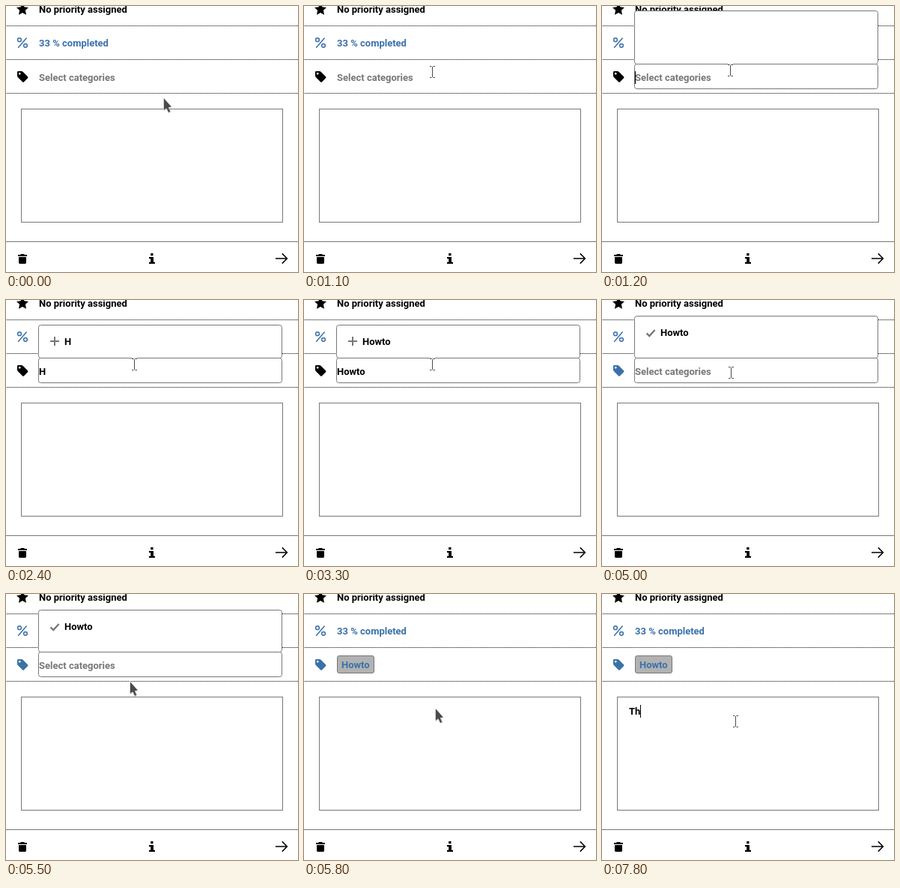
An HTML page that plays this animation: 390x355 px, repeating every 8 s.

```html
<!DOCTYPE html>
<html lang="en">
<head>
<meta charset="utf-8">
<title>Task form</title>
<style>
  html, body { margin: 0; width: 100%; height: 100%; overflow: hidden; background: #fff; }
  svg { display: block; width: 390px; height: 355px; }
  text { font: 700 13px Roboto, sans-serif; white-space: pre; }
  .blue { fill: #3b71a8; }
  .grey { fill: #777; }
  .line { fill: none; stroke: #777; }
  .box { fill: #fff; stroke: #777; }
  .dots { stroke: #000; stroke-dasharray: 1 1; shape-rendering: crispEdges; }
  [hidden] { display: none; }
</style>
</head>
<body>
<svg viewBox="0 0 390 355">
  <path class="dots" d="M1 26.5H390M1 71.5H390M1 116.5H390"/>

  <path d="M22 -4L24.4 1.2L30 1.9L25.9 5.8L27 11.8L22 8.9L17 11.8L18.1 5.8L14 1.9L19.6 1.2Z"/>
  <text x="44" y="9">No priority assigned</text>

  <g fill="none" stroke="#3b71a8" stroke-width="1.5">
    <circle cx="18" cy="45.2" r="2.4"/>
    <circle cx="26" cy="52.8" r="2.4"/>
    <path d="M27.6 42.4L16.2 55.8"/>
  </g>
  <text class="blue" x="44" y="54">33 % completed</text>

  <path id="tag" fill-rule="evenodd" d="M15 88.3Q15 87 16.3 87H20.6Q21.8 87 22.8 88L29 94.2Q30 95.2 29 96.2L24 101.2Q23 102.2 22 101.2L16 95.2Q15 94.2 15 93ZM18.2 88.8a1.4 1.4 0 1 0 .01 0Z"/>

  <g id="editor">
    <rect id="popup" class="box" x="43.5" width="325" rx="3"/>
    <rect class="box" x="43.5" y="77.5" width="325" height="33" rx="3"/>
    <path id="plus" class="line" stroke-width="2" d="M59 55H71M65 49V61"/>
    <path id="check" class="line" stroke-width="2.3" d="M59.6 44.4L63.3 48L70.6 40"/>
    <text id="option" x="78"></text>
  </g>
  <text id="hint" class="grey" x="44" y="100">Select categories</text>
  <text id="input" x="44" y="100"></text>

  <g id="chip">
    <rect x="44.5" y="82.5" width="49" height="23" rx="2.5" fill="#b2b2b2" stroke="#777"/>
    <text class="blue" x="50" y="99">Howto</text>
  </g>

  <rect class="line" x="20.5" y="137.5" width="349" height="151"/>
  <text id="note" x="36" y="161"></text>

  <path class="line" d="M0 314.5H390"/>
  <path d="M20 331H24L25 332H28V334H16V332H19ZM17 335H27V342.6Q27 344 25.6 344H18.4Q17 344 17 342.6Z"/>
  <path d="M193.2 330H196.5V333.2H193.2ZM191 335H197V341.8H199V344H191V341.8H193.2V337.2H191Z"/>
  <path d="M360 337H375.4M368.8 330.4L375.4 337L368.8 343.6" fill="none" stroke="#000" stroke-width="1.5"/>

  <rect id="caret" width="1" height="17"/>
  <g id="arrow">
    <path d="M1 1V18.2L4.8 15.6L7.4 21L10.8 19.4L8.6 14.4L12 13.4Z" opacity=".15"/>
    <path d="M.5 .5V17.5L4.2 14.7L6.9 20.4L9.8 19L7.3 13.6L11.3 12.6Z" fill="#4a4a4a" stroke="#fff" stroke-width=".6"/>
  </g>
  <g id="beam" fill="none">
    <path d="M-3 -7.5H4M-3 7.5H4M.5 -7.5V7.5" stroke="#fff" stroke-width="3" opacity=".7"/>
    <path d="M-3 -7.5H-.5M1.5 -7.5H4M-3 7.5H-.5M1.5 7.5H4M.5 -7V7" stroke="#4a4a4a"/>
  </g>
</svg>
<script>
  const LOOP = 8000;
  const $ = id => document.getElementById(id);
  const show = (id, on) => $(id).toggleAttribute('hidden', !on);

  // Every row starts with the time (ms) from which it holds.
  const pointer = [
    [0, 'arrow', 210, 122], [600, 'arrow', 200, 116], [700, 'beam', 180, 106],
    [800, 'beam', 166, 95], [1100, 'beam', 171, 88], [1200, 'beam', 171, 86],
    [4800, 'beam', 171, 88], [4900, 'beam', 172, 92], [5000, 'beam', 172, 97],
    [5100, 'beam', 172, 102], [5200, 'beam', 173, 108], [5300, 'arrow', 172, 113],
    [5400, 'arrow', 169, 115], [5500, 'arrow', 165, 116], [5700, 'arrow', 168, 129],
    [5800, 'arrow', 175, 152], [5900, 'arrow', 178, 159], [6000, 'beam', 178, 170]
  ];
  const caret = [
    [0], [1200, 44, 87], [2400], [2800, 70, 87], [3200], [3600, 82, 87],
    [4100, 44, 87], [4700], [6400, 36, 148], [7600], [7800, 51, 148]
  ];
  const popupTop = [[0, 0], [1200, 6], [2400, 33], [4100, 21], [5700, 0]];
  const typed = [
    [0, ''], [2400, 'H'], [2700, 'Ho'], [2800, 'How'],
    [3200, 'Howt'], [3300, 'Howto'], [4100, '']
  ];
  const note = [[0, ''], [7600, 'T'], [7800, 'Th']];

  const at = (rows, t) => rows.findLast(row => row[0] <= t).slice(1);

  function draw(t) {
    const [top] = at(popupTop, t);
    const [word] = at(typed, t);
    const added = t >= 4100;
    const closed = t >= 5700;

    show('editor', top);
    if (top) {
      $('popup').setAttribute('y', top + .5);
      $('popup').setAttribute('height', 77 - top);
    }
    show('plus', word);
    show('check', added);
    $('option').textContent = added ? 'Howto' : word;
    $('option').setAttribute('y', added ? 48 : 60);
    $('input').textContent = word;
    show('hint', !word && !closed);
    show('chip', closed);
    $('tag').setAttribute('class', added ? 'blue' : '');
    $('note').textContent = at(note, t)[0];

    const [cx, cy] = at(caret, t);
    show('caret', cx);
    if (cx) {
      $('caret').setAttribute('x', cx);
      $('caret').setAttribute('y', cy);
    }

    const [kind, x, y] = at(pointer, t);
    show('arrow', kind === 'arrow');
    show('beam', kind === 'beam');
    $(kind).setAttribute('transform', `translate(${x} ${y})`);
  }

  const start = performance.now();
  function tick() {
    draw((performance.now() - start) % LOOP);
    requestAnimationFrame(tick);
  }
  tick();
</script>
</body>
</html>
```
